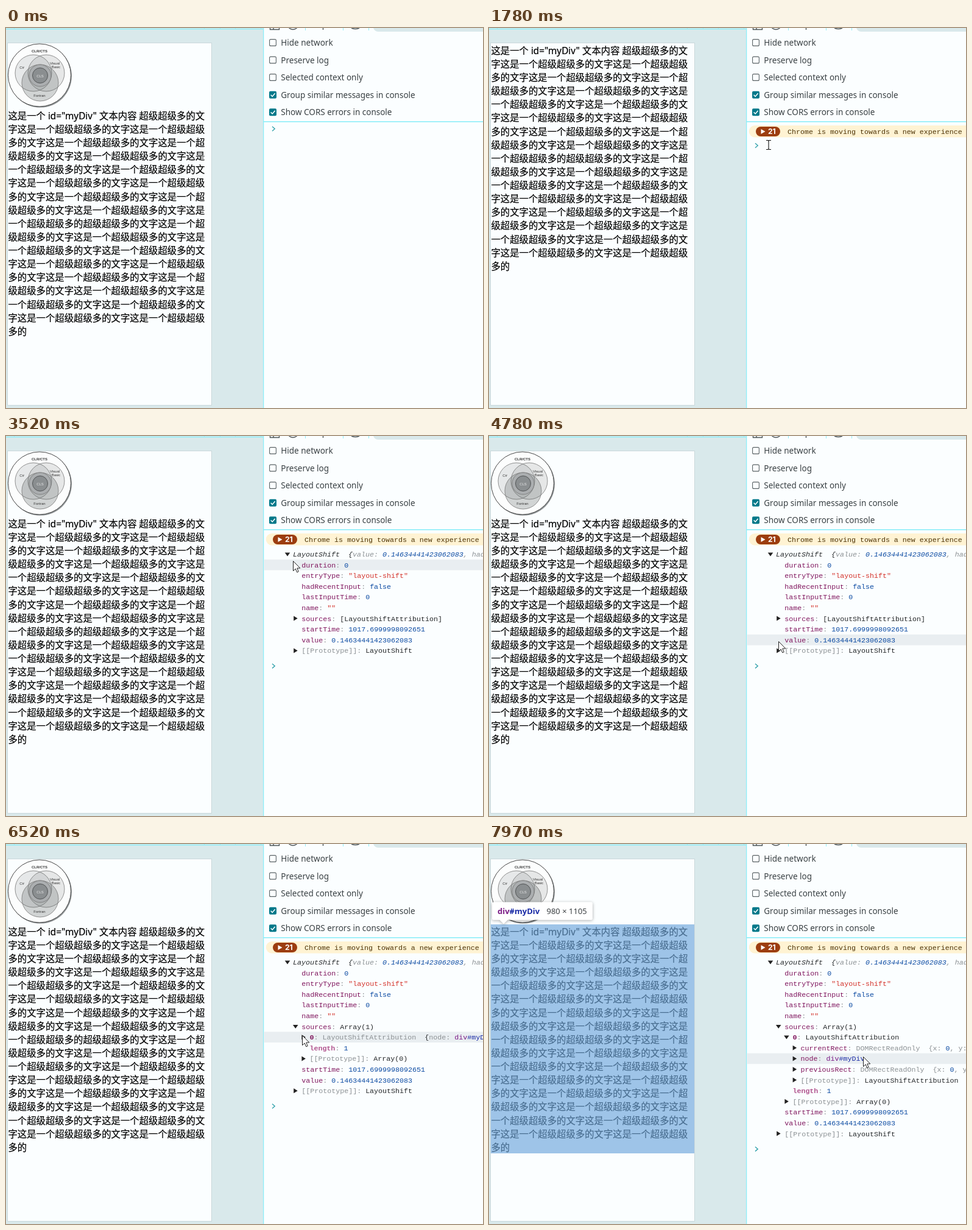
These frames come from a looping animation (783x624 px, 8 s). An HTML page:

```html
<!DOCTYPE html>
<html lang="zh">
<head>
<meta charset="utf-8">
<title>Layout shift in the console</title>
<style>
  html, body { margin: 0; width: 100%; height: 100%; overflow: hidden; background: #d9e9eb; }
  svg { display: block; }
  text { white-space: pre; }
  .page { font: 15.38px "Noto Sans", "Noto Sans CJK SC", "Noto Sans CJK", sans-serif; fill: #000; stroke: #000; stroke-width: .2px; }
  .label { font: 13.5px "Noto Sans", "Open Sans", sans-serif; fill: #3a4144; }
  .code { font: 11.667px "Liberation Mono", monospace; fill: #26292b; }
  .venn { font: 6px "Liberation Sans", sans-serif; fill: #333; text-anchor: middle; }
  .tip { font: 13px "Noto Sans", sans-serif; fill: #3c4043; }
  .bold { font-weight: bold; }
  .key { fill: #80165e; }
  .faintkey { fill: #b25690; font-weight: bold; }
  .num { fill: #0b4aa2; }
  .str { fill: #d4342c; }
  .grey { fill: #8c9194; }
  .tag { fill: #7a1a86; }
  .ident { fill: #1a2ba6; }
  .italic { font-style: italic; }
</style>
</head>
<body>
<svg id="stage" width="783" height="624" viewBox="0 0 783 624"></svg>
<script>
const LOOP = 8000, CYAN = '#8deef8', PAPER = '#fbfeff';
const ROW_Y = 194, ROW_H = 17.6;
const stage = document.getElementById('stage');

const rect = (x, y, w, h, fill, extra = '') =>
  `<rect x="${x}" y="${y}" width="${w}" height="${h}" fill="${fill}" ${extra}/>`;
const circle = (x, y, r, fill, extra = '') =>
  `<circle cx="${x}" cy="${y}" r="${r}" fill="${fill}" ${extra}/>`;
const line = (d, color, width = 1) =>
  `<path d="${d}" fill="none" stroke="${color}" stroke-width="${width}"/>`;
const text = (x, y, cls, body) => `<text x="${x}" y="${y}" class="${cls}">${body}</text>`;
const span = (cls, s) => `<tspan class="${cls}">${s}</tspan>`;
const group = (id, body) => `<g id="${id}">${body}</g>`;

// Page column
function pageText() {
  const unit = '这是一个超级超级多的文字', many = unit.repeat(14);
  const flow = many.slice(11, 166) + many.slice(4, 166);
  const lines = ['这是一个 id="myDiv" 文本内容 超级超级多的文', ...flow.match(/.{1,21}/gu)];
  return lines.map((s, i) => text(3.4, (149.7 + i * 22.13).toFixed(1), 'page', s)).join('');
}

function venn() {
  const edge = 'stroke="#777" stroke-width=".8"';
  return circle(56.2, 78.8, 51.8, '#8d9294') +
    circle(55, 77.5, 51.5, '#fcfdfd', 'stroke="#333" stroke-width=".9"') +
    circle(45, 74, 30, '#e6e8e9', edge) +
    circle(66, 74, 30, 'rgba(95,100,102,.14)', edge) +
    circle(56, 90, 30, 'rgba(95,100,102,.27)', edge) +
    circle(56, 78, 18, '#abaeb0', edge) +
    circle(56, 78, 12.5, '#8a8e90', 'stroke="#4c4f50" stroke-width=".9"') +
    text(55, 40, 'venn bold', 'CLR/CTS') + text(26, 67, 'venn', 'C#') +
    text(80, 60, 'venn', 'Visual') + text(82, 66, 'venn', 'Basic') +
    text(55, 112.5, 'venn', 'Fortran') +
    `<text x="56" y="80.5" class="venn" style="fill:#eee">CLS</text>`;
}

const tooltip = () =>
  `<g filter="url(#shadow)">${rect(5, 95.5, 165, 29, '#fff', 'rx="3"')}<path d="M17 124h14l-7 7z" fill="#fff"/></g>` +
  text(14, 115, 'tip bold', span('tag', 'div') + span('ident', '#myDiv')) +
  text(94.5, 115, 'tip', '980 × 1105');

// Console settings and toolbar edge
function checkbox(y, label, on) {
  const box = on
    ? rect(432, y - 6, 12, 12, '#00798a', 'rx="2"') + line(`M434.6 ${y}l2.6 2.7 4.4-5.2`, '#fff', 1.5)
    : rect(432.6, y - 5.4, 10.8, 10.8, PAPER, 'rx="2" stroke="#5b6366" stroke-width="1.1"');
  return box + text(451.3, y + 5, 'label', label);
}

const settings = () =>
  line('M433.5 0v2.5h15V0M439 0v2M464.500 0q6.500 5 13 0M520.500 0v3M567 0q6.500 3 13 0', '#4a5356', 1.4) +
  line('M491.500 0v4M553.500 0v4M595.500 0v4', CYAN) +
  `<path d="M603 0q2 6 9 6H783V0z" fill="#d9e9eb"/>` +
  checkbox(24, 'Hide network') + checkbox(52.5, 'Preserve log') +
  checkbox(81, 'Selected context only') +
  checkbox(109.8, 'Group similar messages in console', true) +
  checkbox(138.2, 'Show CORS errors in console', true) +
  rect(423, 153, 360, 1.6, CYAN);

const warning = () =>
  `<path d="M783 160H436.500a9.500 9.500 0 0 0 0 19.500H783z" fill="#fff3d3"/>` +
  rect(438, 162, 40, 16, '#9c3d10', 'rx="8"') +
  '<path d="M446.500 166v8l7-4z" fill="#fff"/>' +
  `<text x="458" y="174.300" style="font:bold 12px Inter,sans-serif;fill:#fff">21</text>` +
  `<text x="490" y="174" class="code" style="fill:#4d3407">Chrome is moving towards a new experience</text>`;

// Object tree rows: [depth, arrow ('' none, '>' closed, 'v' open), markup]
const prop = (name, value, cls = 'key') => span(cls, name) + span('grey', ': ') + value;
const proto = (depth, name) => [depth, '>', prop('[[Prototype]]', name, 'grey')];
const node = span('tag', 'div') + span('ident', '#myDiv');
const number = s => span('num', s);
const preview = span('grey', 'DOMRectReadOnly  {x: ') + number('0') + span('grey', ', y: ') + number('0');

function tree(level) {
  const shift = '0.14634441423062083';
  const head = span('italic', 'LayoutShift  {' + span('grey', 'value: ') + number(shift) + span('grey', ', hadRecentInput'));
  if (level < 2) return [];
  if (level === 2) return [[0, '>', head]];
  const rows = [
    [0, 'v', head],
    [1, '', prop('duration', number('0'))],
    [1, '', prop('entryType', span('str', '"layout-shift"'))],
    [1, '', prop('hadRecentInput', number('false'))],
    [1, '', prop('lastInputTime', number('0'))],
    [1, '', prop('name', span('str', '""'))]
  ];
  if (level === 3) rows.push([1, '>', prop('sources', '[LayoutShiftAttribution]')]);
  else {
    rows.push([1, 'v', prop('sources', 'Array(1)')]);
    if (level === 4) rows.push([2, '>', prop('0',
      span('grey', 'LayoutShiftAttribution  ') + '{' + span('grey', 'node: ') + node, 'key bold')]);
    else rows.push(
      [2, 'v', prop('0', 'LayoutShiftAttribution', 'key bold')],
      [3, '>', prop('currentRect', preview)],
      [3, '>', prop('node', node)],
      [3, '>', prop('previousRect', preview)],
      proto(3, 'LayoutShiftAttribution'));
    rows.push([2, '', prop('length', number('1'), 'faintkey')], proto(2, 'Array(0)'));
  }
  rows.push([1, '', prop('startTime', number('1017.6999998092651'))],
    [1, '', prop('value', number(shift))], proto(1, 'LayoutShift'));
  return rows;
}

function drawRow([depth, arrow, body], i) {
  const y = ROW_Y + i * ROW_H, x = depth ? 472 + depth * 13.2 : 471, ax = 462 + depth * 13.2;
  const d = arrow === '>' ? `M${ax - 3} ${y - 4}v8l6.500-4z` : `M${ax - 4.3} ${y - 2.6}h8.600l-4.300 6z`;
  return (arrow ? `<path d="${d}" fill="#222"/>` : '') + text(x, (y + 4).toFixed(1), 'code', body);
}

const trees = [0, 1, 2, 3, 4, 5].map(tree);
const promptY = level => level === 0 ? 165.5 : level === 1 ? 193 : ROW_Y + (trees[level].length - 1) * ROW_H + 25.3;

stage.innerHTML =
  '<defs><filter id="shadow" x="-10%" y="-30%" width="120%" height="170%"><feDropShadow dx="0" dy="1" stdDeviation="2.500" flood-opacity=".35"/></filter></defs>' +
  rect(0, 0, 783, 624, '#d9e9eb') + rect(0, 1, 422, 1.4, CYAN) +
  line('M13.500 0v2M325.500 0v2M351.500 0v2M376.500 0v2M418.500 0v2', CYAN) +
  rect(2.5, 24.5, 335, 595, PAPER, 'stroke="#cad8db"') +
  group('image', venn()) + group('words', pageText()) +
  group('overlay', rect(3, 132, 334, 376, 'rgba(111,168,220,.66)') + tooltip()) +
  rect(422, 0, 361, 624, PAPER) + rect(422, 0, 1.3, 624, CYAN) + settings() +
  group('warning', warning()) +
  rect(423.3, 0, 360, 17.6, '#e9eef1', 'id="hover"') +
  trees.map((rows, i) => group('tree' + i, rows.map(drawRow).join(''))).join('') +
  group('prompt', line('M437 -3.700l4.200 3.700-4.200 3.700', '#35a3ad', 1.4)) +
  group('arrow', '<path d="M.5.5v16l3.700-3.500 2.500 5.800 2.500-1.100-2.400-5.700h5z" fill="#fff" stroke="#222"/>') +
  group('beam', line('M-4 -7.500h3l1 1 1-1h3M0 -6.500v13M-4 7.500h3l1-1 1 1h3', '#111', 1.1));

const part = id => document.getElementById(id);
const show = (id, on) => { part(id).style.display = on ? '' : 'none'; };
const moveTo = (id, x, y) => part(id).setAttribute('transform', `translate(${x} ${y})`);

// Times at which the console reaches each level
const LEVELS = [0, 1110, 1870, 2760, 5760, 6740];
const RELOAD = 830, SHIFT = 1870;

const HIDDEN = 0, ARROW = 1, BEAM = 2;
// Pointer: time, x, y, kind
const TRACK = [
  [0, 79, 0, HIDDEN], [180, 79, 0, ARROW], [230, 79, 0, HIDDEN],
  [990, 243, 86, ARROW], [1110, 370, 142, ARROW], [1170, 432, 176, BEAM], [1230, 459, 191.5, BEAM],
  [1870, 459, 192, ARROW], [2170, 457, 195, ARROW], [2390, 457, 195, ARROW], [2530, 462, 194, ARROW],
  [3280, 462, 194, ARROW], [3520, 471, 205, ARROW], [3800, 480, 262, ARROW], [4070, 476, 300, ARROW],
  [4130, 476, 300, ARROW], [4500, 479, 322, ARROW], [4780, 475, 337, ARROW], [4920, 476, 337, ARROW],
  [4980, 477, 337, ARROW], [5200, 482, 316, ARROW], [5380, 477, 301, ARROW],
  [6180, 477, 301, ARROW], [6520, 486, 314, ARROW],
  [7400, 486, 314, ARROW], [7450, 492, 315, ARROW],
  [7730, 492, 315, ARROW], [7850, 556, 337, ARROW], [7960, 614, 349, ARROW], [LOOP, 614, 349, ARROW]
];

function pointer(t) {
  const i = TRACK.findIndex(k => k[0] > t) - 1;
  const [t0, x0, y0, kind] = TRACK[i], [t1, x1, y1] = TRACK[i + 1];
  const u = (t - t0) / (t1 - t0);
  return { x: Math.round(x0 + (x1 - x0) * u), y: Math.round(y0 + (y1 - y0) * u), kind };
}

function render(t) {
  const level = LEVELS.filter(at => at <= t).length - 1;
  const loading = t >= RELOAD && t < SHIFT;
  const { x, y, kind } = pointer(t);
  const row = Math.round((y - ROW_Y) / ROW_H);
  const hovering = level >= 2 && row >= 0 && row < trees[level].length;

  show('image', !loading);
  moveTo('words', 0, loading ? -107 : 0);
  show('overlay', level === 5 && row === 9);
  show('warning', level > 0);
  trees.forEach((_, i) => show('tree' + i, i === level));
  moveTo('prompt', 0, promptY(level));
  show('hover', hovering);
  moveTo('hover', 0, ROW_Y + row * ROW_H - 8.8);
  show('arrow', kind === ARROW);
  show('beam', kind === BEAM);
  moveTo('arrow', x, y);
  moveTo('beam', x, y);
}

const start = performance.now();
function tick() {
  render((performance.now() - start) % LOOP);
  requestAnimationFrame(tick);
}
tick();
</script>
</body>
</html>
```
